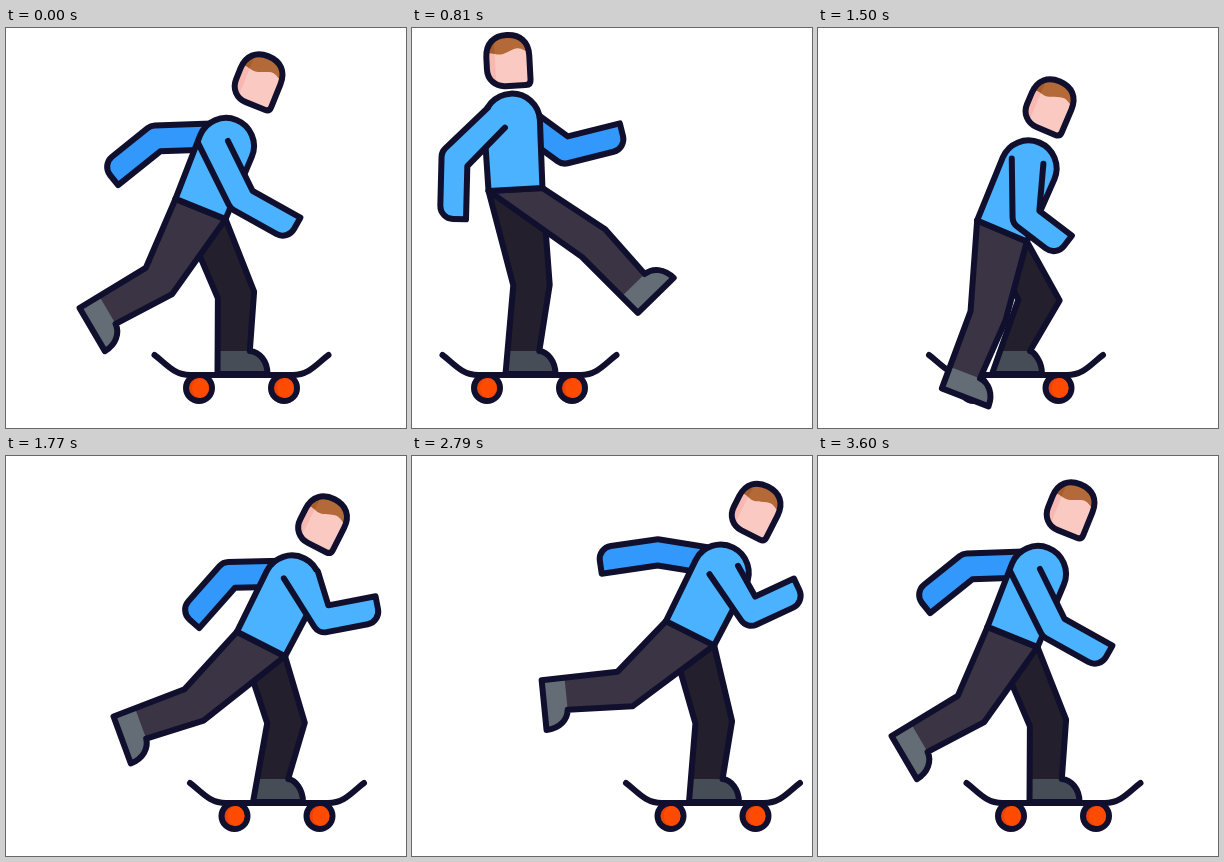
An HTML page with a canvas for the animation above (3.63 s loop, 400 px wide and 400 px high).

```html
<!DOCTYPE html>
<html lang="en">
<head>
<meta charset="utf-8">
<title>Skateboarder</title>
<style>
  html, body { margin: 0; width: 100%; height: 100%; overflow: hidden; background: #fff; }
  canvas { display: block; width: 400px; height: 400px; }
</style>
</head>
<body>
<canvas id="stage"></canvas>
<script>
const LOOP = 3630, SPAN = 3600, STEP = 30;
const INK = '#10102e';
const canvas = document.getElementById('stage');
const ctx = canvas.getContext('2d');
const ratio = window.devicePixelRatio || 1;
canvas.width = canvas.height = 400 * ratio;

// Smooth periodic curve through [time, ...values] keys, without overshoot.
function track(...keys) {
  const n = keys.length;
  const time = i => keys[(i + n) % n][0] + Math.floor(i / n) * SPAN;
  const value = (i, c) => keys[(i + n) % n][c];
  const secant = (i, c) => (value(i + 1, c) - value(i, c)) / (time(i + 1) - time(i));
  const slope = (i, c) => {
    const a = secant(i - 1, c), b = secant(i, c);
    return a * b > 0 ? 2 * a * b / (a + b) : 0;
  };
  return t => {
    let i = n - 1;
    while (time(i) > t) i--;
    const h = time(i + 1) - time(i), u = (t - time(i)) / h, v = 1 - u;
    return keys[0].slice(1).map((_, k) => {
      const c = k + 1;
      return v * v * (1 + 2 * u) * value(i, c) + u * u * (3 - 2 * u) * value(i + 1, c)
        + h * u * v * (v * slope(i, c) - u * slope(i + 1, c));
    });
  };
}

// Board x; every joint below is measured from it.
const board = track([0, 235.5], [540, 158], [810, 117.5], [1080, 94], [1260, 96], [1380, 134],
  [1500, 198], [1620, 249], [1770, 271], [2250, 302.5], [2600, 303.5], [3210, 283.5]);

// Hip x, y and lean in degrees.
const hip = track([0, -41, 181, 22], [400, -25, 165, 8], [600, -18, 159.5, 0], [810, -14, 161.5, -3],
  [1080, -14, 165.5, 0], [1260, -12, 195.5, 8], [1380, -12, 206, 16], [1500, -14, 203, 23],
  [1770, -16, 188, 27], [2250, -18, 176, 28], [3210, -29, 179, 25]);

const head = track([0, 17.5, 52], [400, 1, 35], [600, -13, 30.5], [810, -21.5, 32.5], [1080, -19, 36.5],
  [1260, 7, 68], [1380, 20, 78], [1500, 34, 77], [1770, 46, 66], [2250, 48.5, 54], [3210, 35.5, 53]);

const backKnee = track([0, -5.5, 267], [810, 2, 257], [1260, 18, 270], [1500, 23, 272],
  [1770, 9, 267], [2250, 5, 267], [3210, -2.5, 266]);

// Knee x, y and ankle x, y of the pushing leg.
const pushLeg = track([0, -82.5, 253, -133.5, 283], [400, -2, 251, -26, 303], [810, 64, 215, 104.5, 256.5],
  [1080, 61, 224, 103, 265], [1260, 40, 268, 66, 324], [1380, 12, 292, 22, 354],
  [1500, -28, 288, -50, 345], [1620, -72, 262, -122, 298], [1770, -83, 249, -136, 268.5],
  [2250, -97.5, 221, -157, 214], [3210, -81.5, 246, -137, 266.5]);

// Elbow x, y and hand x, y.
const farArm = track([0, -86, 110.5, -131.5, 147], [400, -25, 152, -28, 200], [810, 35.5, 122.5, 93.5, 108],
  [1260, 24, 178, 82.5, 190], [1500, -16, 182, -10, 225], [1770, -48, 119, -87.5, 163.5],
  [2250, -47.5, 92, -106.5, 91], [3210, -67, 102.5, -118.5, 124]);
const nearArm = track([0, 0, 171.5, 52.5, 201], [400, -37, 157, -18, 211], [810, -75, 131, -76.5, 191],
  [1260, -36, 175, -41.5, 231], [1500, 10, 189, 48, 218], [1770, 46.5, 163.5, 101, 153],
  [2250, 45, 153, 88.5, 106], [3210, 28, 162.5, 84.5, 170]);

// Where both edges of the near sleeve begin, from the shoulder.
const sleeve = track([0, -28, -3, 2, -5], [810, -24, -14, -7, 6], [1260, -23, -13, 2, 3],
  [1770, -8, -5, 26, -12], [2250, -3, 2, 24, -8], [3210, -21, 1, 10, -6]);

const add = (p, q, k = 1) => [p[0] + q[0] * k, p[1] + q[1] * k];
const unit = (p, q) => {
  const x = q[0] - p[0], y = q[1] - p[1], l = Math.hypot(x, y) || 1;
  return [x / l, y / l];
};
const side = d => [-d[1], d[0]];

function paint(fill) {
  ctx.fillStyle = fill;
  ctx.fill();
  ctx.stroke();
}

// Both edge points of a bent limb at its middle joint.
function bend(p, q, r, w) {
  const d = unit(p, q), e = unit(q, r);
  const m = unit([0, 0], [d[0] + e[0], d[1] + e[1]]);
  const k = w / Math.max(0.5, m[0] * d[0] + m[1] * d[1]);
  return [add(q, side(m), k), add(q, side(m), -k)];
}

function drawArm(root, elbow, hand, color, starts) {
  const w = 13, n = side(unit(elbow, hand));
  const [inner, outer] = bend(root, elbow, hand, w);
  const r = side(unit(root, elbow));
  const [from, to] = starts || [add(root, r, w), add(root, r, -w)];
  const corner = add(hand, n, w), tip = add(hand, n, -w);
  ctx.beginPath();
  ctx.moveTo(...from);
  ctx.arcTo(...inner, ...corner, 12);
  ctx.arcTo(...corner, ...tip, 13);
  ctx.lineTo(...tip);
  ctx.lineTo(...outer);
  ctx.lineTo(...to);
  paint(color);
}

function drawLeg(hips, knee, ankle, down, lean, color, shoe) {
  const mid = add(hips[0], [(hips[1][0] - hips[0][0]) / 2, (hips[1][1] - hips[0][1]) / 2]);
  const [back, front] = bend(mid, knee, ankle, 18);
  const toe = side(down);
  const at = (d, n) => add(add(ankle, down, d), toe, -n);
  const path = new Path2D();
  path.moveTo(...hips[0]);
  path.lineTo(...back);
  path.lineTo(...at(23, -17));
  path.lineTo(...at(23, 33));
  path.bezierCurveTo(...at(10, 33), ...at(1, 25), ...at(0, 15 + lean));
  path.lineTo(...front);
  path.lineTo(...hips[1]);
  path.closePath();
  ctx.fillStyle = color;
  ctx.fill(path);
  ctx.save();
  ctx.clip(path);
  ctx.beginPath();
  for (const p of [[0, -40], [40, -40], [40, 50], [0, 50]]) ctx.lineTo(...at(...p));
  ctx.fillStyle = shoe;
  ctx.fill();
  ctx.restore();
  ctx.stroke(path);
}

function drawBoard(x) {
  ctx.save();
  ctx.translate(x, 347);
  ctx.beginPath();
  ctx.moveTo(-87, -20);
  ctx.bezierCurveTo(-76, -12, -68, 0, -51, 0);
  ctx.lineTo(51, 0);
  ctx.bezierCurveTo(68, 0, 76, -12, 87, -20);
  ctx.stroke();
  for (const w of [-42.5, 42.5]) {
    ctx.beginPath();
    ctx.arc(w, 13, 13, 0, 7);
    paint('#ea4208');
    ctx.beginPath();
    ctx.ellipse(w + 1.5, 13, 8.5, 10, 0, 0, 7);
    ctx.fillStyle = '#ff4b00';
    ctx.fill();
  }
  ctx.restore();
}

function drawTorso(p, angle) {
  ctx.save();
  ctx.translate(...p);
  ctx.rotate(angle);
  ctx.beginPath();
  ctx.moveTo(-27, 0);
  ctx.arc(0, -68, 28, Math.PI, 0);
  ctx.lineTo(27, 0);
  ctx.closePath();
  paint('#4ab2ff');
  ctx.restore();
}

const face = new Path2D('M-21.5-4C-21.5-18-13-25.5 0-25.5S21.5-18 21.5-4V20.5Q21.5 25.5 16.5 25.5H-4C-14 25.5-21.5 18-21.5 8Z');
const hair = new Path2D('M-24-30H24V-7C17-7 14-14 6-11S-6-5-12-7S-19-8-24-7Z');

function drawHead(p, angle) {
  ctx.save();
  ctx.translate(...p);
  ctx.rotate(angle);
  ctx.fillStyle = '#f9c9c2';
  ctx.fill(face);
  ctx.save();
  ctx.clip(face);
  ctx.fillStyle = '#f6b8b0';
  ctx.fillRect(-24, -30, 11, 60);
  ctx.fillStyle = '#b46a38';
  ctx.fill(hair);
  ctx.clip(hair);
  ctx.fillStyle = '#a65c2c';
  ctx.fillRect(-24, -30, 11, 60);
  ctx.restore();
  ctx.stroke(face);
  ctx.restore();
}

function draw(t) {
  const [x] = board(t);
  const shift = p => [p[0] + x, p[1]];
  const pair = v => [shift(v), shift(v.slice(2))];
  const [hx, hy, lean] = hip(t);
  const angle = lean * Math.PI / 180, c = Math.cos(angle), s = Math.sin(angle);
  const base = shift([hx, hy]);
  const hips = [add(base, [c, s], -27), add(base, [c, s], 27)];
  const shoulder = add(base, [s, -c], 68);
  const stand = [x - 7, 323], standKnee = shift(backKnee(t));
  const [knee, ankle] = pair(pushLeg(t));
  const cuff = sleeve(t);

  ctx.setTransform(ratio, 0, 0, ratio, 0, 0);
  ctx.fillStyle = '#fff';
  ctx.fillRect(0, 0, 400, 400);
  ctx.strokeStyle = INK;
  ctx.lineWidth = 6;
  ctx.lineCap = ctx.lineJoin = 'round';

  drawArm(add(shoulder, [0, -10]), ...pair(farArm(t)), '#3298fb');
  drawLeg(hips, standKnee, stand, [0, 1], (standKnee[0] - stand[0]) * 0.2, '#241f2c', '#474d57');
  drawBoard(x);
  drawLeg(hips, knee, ankle, unit(knee, ankle), 0, '#3a3444', '#646d76');
  drawTorso(base, angle);
  drawArm(shoulder, ...pair(nearArm(t)), '#4ab2ff',
    [add(shoulder, cuff), add(shoulder, cuff.slice(2))]);
  drawHead(shift(head(t)), angle);
}

const start = performance.now();
function tick() {
  const t = (performance.now() - start) % LOOP;
  draw(Math.floor(t / STEP) * STEP % SPAN);
  requestAnimationFrame(tick);
}
tick();
</script>
</body>
</html>
```
